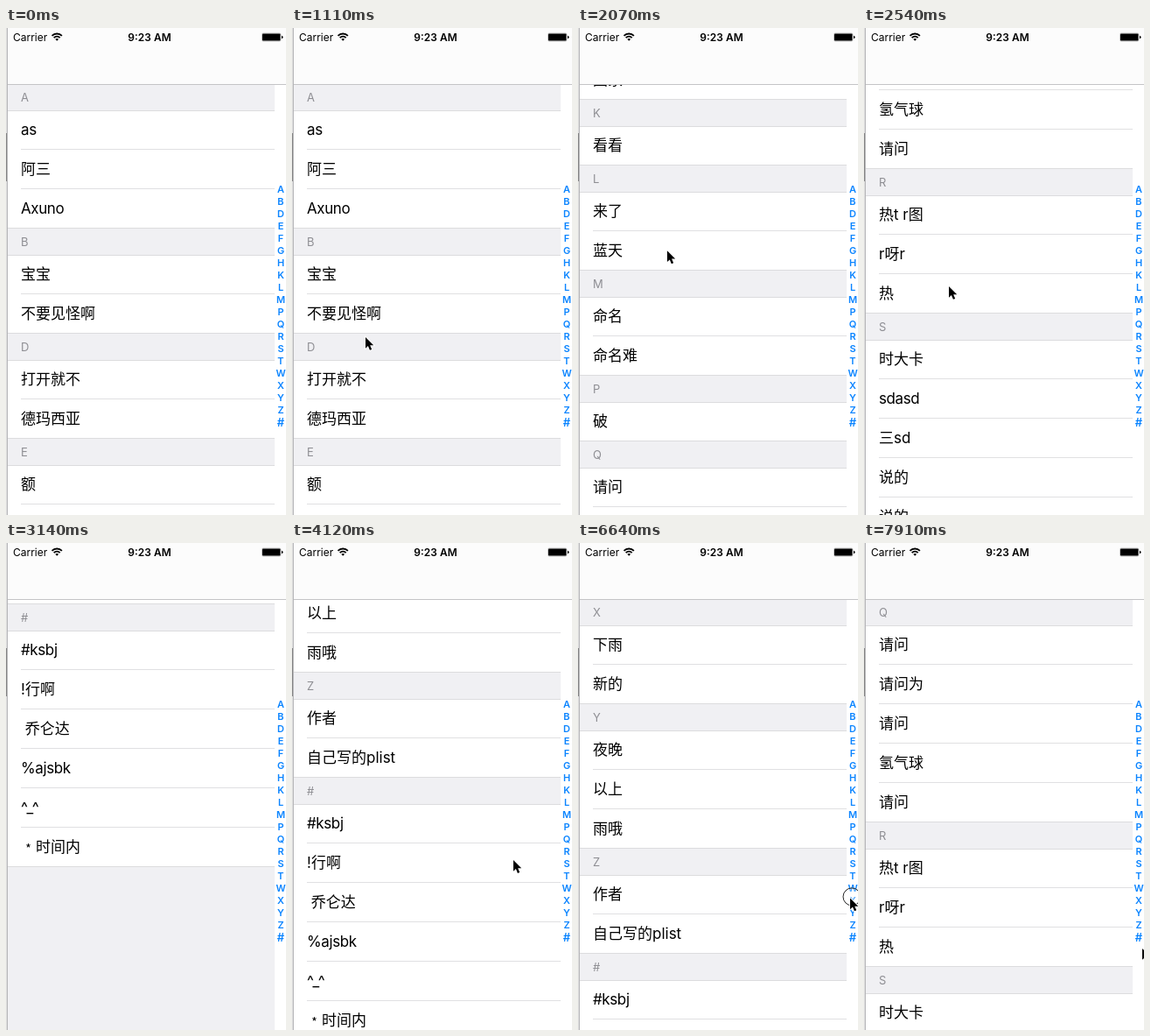
An HTML page that plays this animation: 320 by 556 pixels, repeating every 8 s.

```html
<!DOCTYPE html>
<html lang="zh-CN">
<head>
<meta charset="utf-8">
<style>
html, body { margin: 0; width: 100%; height: 100%; overflow: hidden; background: #fff; }
body { font-family: Inter, "Noto Sans CJK SC", "Noto Sans CJK", sans-serif; color: #000; }
#stage { position: relative; width: 320px; height: 556px; overflow: hidden; }
#stage > * { position: absolute; }
#table { left: 2px; top: 64px; width: 305px; height: 492px; background: #f0f0f3; overflow: hidden; }
#list { position: absolute; top: 0; width: 100%; will-change: transform; }
.head, .row { position: relative; box-sizing: border-box; padding-left: 15px; white-space: pre; }
.head { height: 30px; font-size: 13px; line-height: 30px; color: #8e8e93; background: #f0f0f3; }
.row { height: 45px; font-size: 17px; line-height: 45px; background: #fff; }
.latin { letter-spacing: -.4px; }
.row::after { content: ""; position: absolute; left: 15px; right: 0; bottom: 0; height: 1px; background: #e0e0e2; }
.row.last::after { left: 0; background: #dcdcde; }
.head + .row { box-shadow: inset 0 1px #dcdcde; }
#index { left: 307px; top: 64px; width: 13px; height: 379px; padding-top: 113px; background: #fff;
  font-size: 11px; font-weight: 600; line-height: 14px; text-align: center; color: #0a84ff; }
#index div { margin: 0 -3px 0 -2px; }
#index div:last-child { font-size: 13px; }
#nav { left: 2px; top: 0; width: 318px; height: 64px; background: #fcfcfc; border-bottom: 1px solid #c4c4c6; }
.status { top: 0; font-size: 12px; line-height: 21px; white-space: nowrap; }
#edge { left: 0; top: 0; width: 1px; height: 556px; border-right: 1px solid #b4b4b6;
  background: linear-gradient(#e2e2e2 120px, #888 120px 175px, #e2e2e2 175px); }
#over { left: 0; top: 0; }
</style>
</head>
<body>
<div id="stage">
  <div id="table"><div id="list"></div></div>
  <div id="index"></div>
  <div id="nav"></div>
  <div id="edge"></div>
  <div class="status" style="left:8px">Carrier</div>
  <div class="status" style="left:114px;width:100px;text-align:center;font-weight:600">9:23 AM</div>
  <svg id="over" width="320" height="556">
    <g fill="none" stroke="#000" stroke-width="1.8">
      <path d="M52.5 8.9a8 8 0 0 1 11.4 0M54.7 11.2a5 5 0 0 1 7 0"/>
      <path d="M58.2 14.8l-1.9-2a2.8 2.8 0 0 1 3.8 0z" fill="#000" stroke="none"/>
    </g>
    <rect x="292.5" y="6" width="21.5" height="9" rx="1.5" fill="none" stroke="#999" stroke-width=".6"/>
    <rect x="293" y="6.5" width="20.5" height="8" rx=".8"/>
    <path d="M315 8.8q1.6.4 1.6 1.7t-1.6 1.7z"/>
    <g id="cursor">
      <circle id="touch" cx="2" cy="-.5" r="10" fill="#fff" fill-opacity=".3" stroke="#222"/>
      <path d="M0 0v14.5l3.3-3 2.3 5.4 2.6-1.1-2.3-5.2h4.6z" transform="translate(0 1) scale(.88)"
        stroke="#fff" stroke-width="2" paint-order="stroke"/>
    </g>
  </svg>
</div>
<script>
const $ = id => document.getElementById(id);

const sections = {
  A: 'as,阿三,Axuno', B: '宝宝,不要见怪啊', D: '打开就不,德玛西亚', E: '额,厄特认同,额', F: '方方',
  G: '光投,瓜田', H: '好的,回家', K: '看看', L: '来了,蓝天', M: '命名,命名难', P: '破',
  Q: '请问,请问为,请问,氢气球,请问', R: '热t r图,r呀r,热', S: '时大卡,sdasd,三sd,说的,说的,说的',
  T: '天空,图片', W: '为什么,我们', X: '下雨,新的', Y: '夜晚,以上,雨哦', Z: '作者,自己写的plist',
  '#': '#ksbj,!行啊, 乔仑达,%ajsbk,^_^,﹡时间内'
};

function add(parent, cls, text) {
  const el = document.createElement('div');
  el.className = cls;
  el.textContent = text;
  el.classList.toggle('latin', cls === 'row' && /^[!-~]+$/.test(text));
  parent.append(el);
  return el;
}

const offsets = {}, letters = Object.keys(sections);
let height = 0;
for (const key of letters) {
  offsets[key] = height;
  add($('index'), '', key);
  add($('list'), 'head', key);
  const rows = sections[key].split(',').map(text => add($('list'), 'row', text));
  rows.at(-1).classList.add('last');
  height += 30 + 45 * rows.length;
}
const bottom = height - 504; // the device screen reaches 12px below the stage
const overshoot = 199;

const ramp = (t, from, to) => Math.min(1, Math.max(0, (t - from) / (to - from)));
const smooth = p => p * p * (3 - 2 * p);
const mix = (a, b, p) => a + (b - a) * p;

// Pointer rests on its way, as [time, x, y]
const path = [
  [300, -14, 392], [940, 84, 352], [1110, 84, 352], [1350, 107, 211], [1590, 107, 211],
  [2540, 97, 294], [3100, -20, 300], [4120, 253, 361], [4500, 290, 525], [5040, 311, 312]
];
const drag = { from: 5270, to: 6930, y: 312, swing: 104 };
const tap = { from: 7380, to: 7560, y: 337 };

function pointerAt(t) {
  if (t >= tap.from) {
    const p = smooth(ramp(t, tap.to, 7910));
    return [mix(311, 318, p), mix(tap.y, 462, p)];
  }
  if (t >= drag.from) {
    const wave = Math.sin(2 * Math.PI * ramp(t, drag.from, drag.to));
    return [311, mix(drag.y - drag.swing * wave, tap.y, smooth(ramp(t, 6980, 7150)))];
  }
  const i = path.findIndex(k => k[0] > t);
  if (i < 0) return path.at(-1).slice(1);
  const b = path[i], a = path[i - 1] || b;
  const p = smooth(ramp(t, a[0], b[0]));
  return [mix(a[1], b[1], p), mix(a[2], b[2], p)];
}

function scrollAt(t) {
  if (t < 1590) return 240 * smooth(ramp(t, 1110, 1350)) + 48 * ramp(t, 1530, 1590);
  const middle = offsets.R - 99;
  if (t < 2540) return mix(288, middle, ramp(t, 1590, 2540));
  if (t < 3140) return mix(middle, bottom + overshoot, ramp(t, 2540, 3140));
  if (t < drag.from) return bottom + overshoot * (1 - ramp(t, 3140, 3700)) ** 3;
  if (t >= tap.from) return offsets.Q;
  const y = pointerAt(Math.min(t, drag.to))[1];
  return Math.min(offsets[letters[Math.floor((y - 178) / 14)]], bottom);
}

function draw(now) {
  const t = now % 8000;
  const [x, y] = pointerAt(t);
  const pressed = [drag, tap].some(touch => t >= touch.from && t < touch.to);
  $('list').style.transform = `translateY(${-Math.round(scrollAt(t))}px)`;
  $('cursor').setAttribute('transform', `translate(${x} ${y})`);
  $('touch').style.display = pressed ? '' : 'none';
  requestAnimationFrame(draw);
}
draw(performance.now());
</script>
</body>
</html>
```
